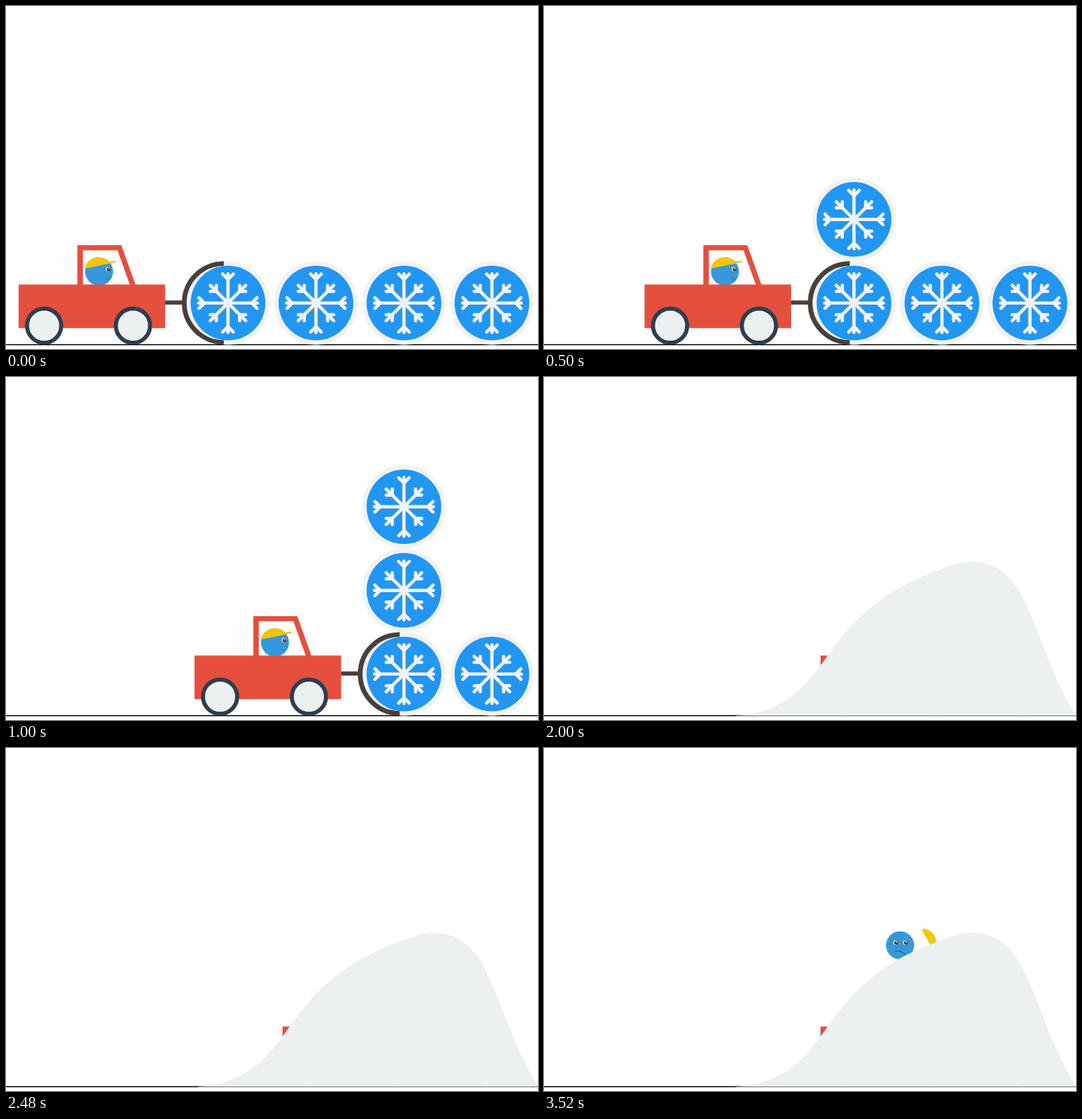
Write an HTML page that moves like this. It is 706x456 px and loops after 4000 ms.

```html
<!DOCTYPE html>
<html lang="en">
<head>
<meta charset="utf-8">
<title>Snow truck</title>
<style>
html, body { margin: 0; height: 100%; overflow: hidden; background: #fff; }
svg { display: block; }
</style>
</head>
<body>
<svg width="706" height="456" viewBox="0 0 706 456">
  <defs>
    <g id="arms" fill="none" stroke="#f2f2f2" stroke-width="4.4" stroke-linecap="round">
      <path d="M0 0V-39M-7-38.5L0-31.5L7-38.5"/>
      <path d="M0 0L23.5-23.5M15.5-23.5V-15.5H23.5"/>
    </g>
    <g id="flake">
      <circle r="55.5" fill="#f2f2f2"/>
      <circle r="49.6" fill="#2196f3"/>
      <use href="#arms"/>
      <use href="#arms" transform="rotate(90)"/>
      <use href="#arms" transform="rotate(180)"/>
      <use href="#arms" transform="rotate(270)"/>
      <circle r="5.5" fill="#f2f2f2"/>
    </g>
    <g id="eye">
      <circle r="3.7" fill="#ecf0f1" stroke="#2c3e50" stroke-width=".6"/>
      <circle cx=".8" cy=".2" r="2.5" fill="#34424f"/>
      <circle cx="1.4" cy="-.7" r=".8" fill="#fff"/>
    </g>
    <circle id="wheel" r="22.7" cy="425" fill="#ecf0f1" stroke="#2c3e50" stroke-width="5.4"/>
  </defs>

  <rect y="449.6" width="706" height="1.4" fill="#000"/>
  <g id="flakes"></g>

  <g id="truck">
    <g fill="none" stroke="#4a3f39">
      <path d="M211 394.2H236" stroke-width="5.5"/>
      <path d="M289 342.3A52.5 52.5 0 0 0 289 447.3" stroke-width="6.3"/>
    </g>
    <circle cx="123.5" cy="353" r="18.6" fill="#3498db"/>
    <path d="M105 349C106 339 115 333.5 124 334Q132 334.500 137.500 339.500Q142 339 147.500 338.500Q146 341 138 342.300Z" fill="#f1c40f"/>
    <use href="#eye" x="135.2" y="350"/>
    <path d="M131 361Q134.500 365 139 362" fill="none" stroke="#2574a9" stroke-width=".8"/>
    <g fill="#e54f3d">
      <path d="M94.700 318H153L172 371H164.500L148 324.800H102V371H94.700Z"/>
      <rect x="16.7" y="370.3" width="194.500" height="58"/>
    </g>
    <use href="#wheel" x="50.6"/>
    <use href="#wheel" x="168.500"/>
  </g>

  <g id="driver">
    <circle cx="472.500" cy="262.300" r="18.600" fill="#3498db"/>
    <use href="#eye" x="466.400" y="258.800"/>
    <use href="#eye" x="479.300" y="258.800"/>
    <path d="M466 270.500Q473 268 480 275" fill="none" stroke="#2c3e50" stroke-width=".8"/>
    <path d="M501 240.800C511 239.500 520 247 521 260L513 263Z" fill="#f6c60d"/>
  </g>

  <path id="hill" fill="#ecf0f1" d="M250 450.500C355 446 362 368 427 312C465 278 505 262 550 248C578 240 612 250 632 287C657 333 667 384 706 450.500Z"/>
</svg>
<script>
const get = id => document.getElementById(id);
const [truck, flakes, driver, hill] = ["truck", "flakes", "driver", "hill"].map(get);
const COUNT = 4, STEP = 116.75, RISE = 111.2;

for (let i = 0; i < COUNT; i++) {
  const flake = document.createElementNS("http://www.w3.org/2000/svg", "use");
  flake.setAttribute("href", "#flake");
  flakes.append(flake);
}

const show = (el, on) => el.setAttribute("visibility", on ? "visible" : "hidden");

function draw(now) {
  const t = now % 4000;
  const k = Math.min(COUNT - 1, Math.floor(t / 500));
  truck.setAttribute("transform", `translate(${k * STEP})`);
  // Flakes already reached pile up above the plough.
  [...flakes.children].forEach((flake, i) => {
    const x = 294.6 + Math.max(i, k) * STEP;
    const y = 394.9 - Math.max(0, k - i) * RISE;
    flake.setAttribute("transform", `translate(${x} ${y})`);
  });
  show(flakes, t < 2000);
  show(hill, t >= 2000);
  show(driver, t >= 2800);
}

const start = performance.now();
function tick() {
  draw(performance.now() - start);
  requestAnimationFrame(tick);
}
tick();
</script>
</body>
</html>
```
